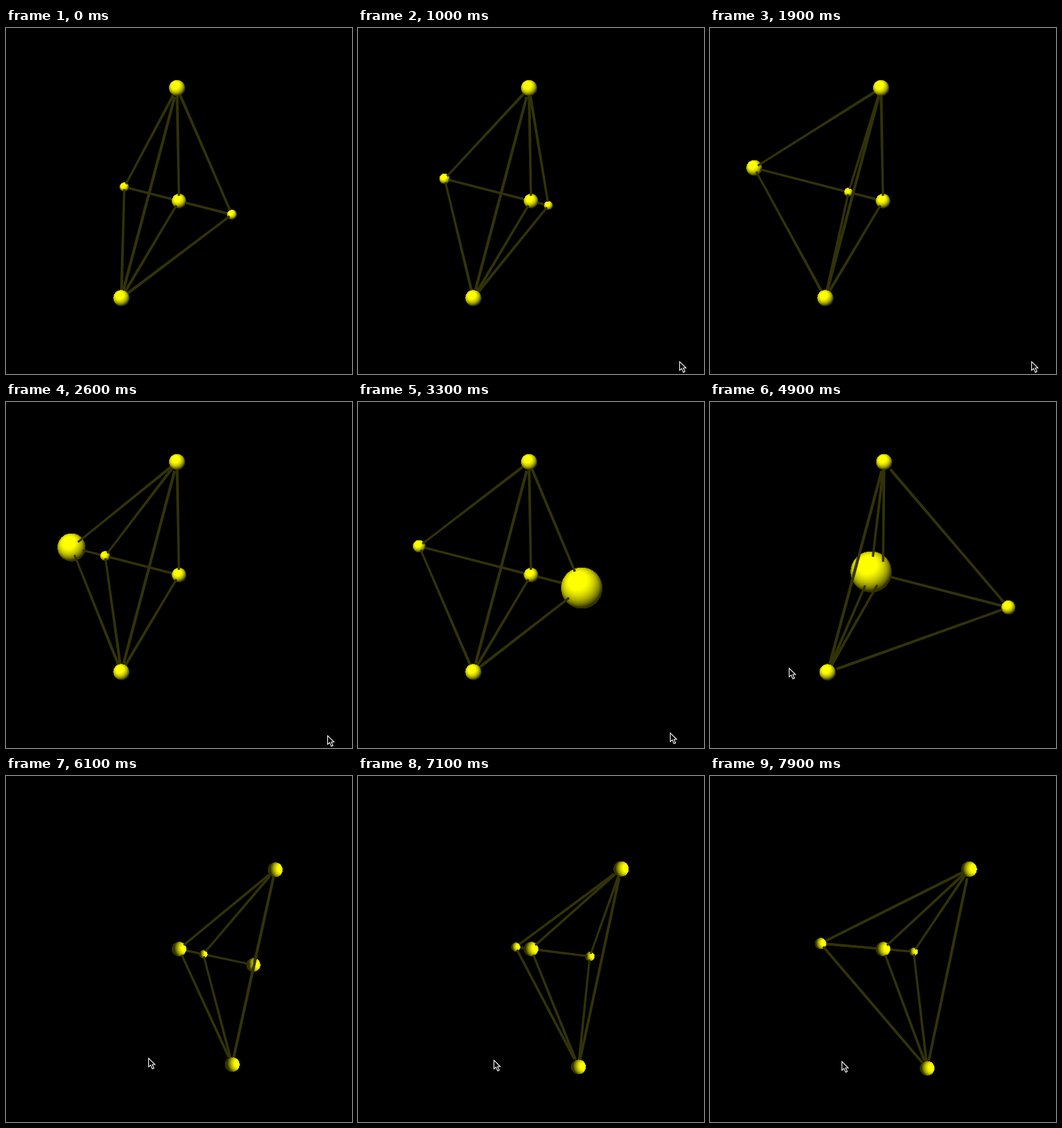
These frames come from a looping animation (518 px wide and 518 px high, 8 s). An HTML page with a canvas:

```html
<!DOCTYPE html>
<html>
<head>
<meta charset="utf-8">
<style>
html, body { margin: 0; width: 100%; height: 100%; overflow: hidden; background: #000; }
canvas { display: block; }
</style>
</head>
<body>
<canvas id="stage" width="518" height="518"></canvas>
<script>
const ctx = document.getElementById('stage').getContext('2d');
const RAD = Math.PI / 180;
const MID = 259, SCALE = 180, NEAR = 0.3096;   // 3D perspective
const W_DIST = 1.53;                           // viewer distance along the fourth axis
const TOP = [-0.013, 0.642, 0.767];
const LOW = [-0.376, -0.727, 0.601];
const AXIS = [0.928, -0.277, 0.247];           // third axis, turned into the fourth
const LIGHT = [-0.22, 0.25, 0.94];

function ease(t, from, to) {
  const f = Math.min(1, Math.max(0, (t - from) / (to - from)));
  return f * f * (3 - 2 * f);
}

// The pointer crosses the stage, then drags the camera out and partly back
function motion(t) {
  const cross = ease(t, 3200, 4050);
  const dragX = 97 * ease(t, 4780, 6100), dragY = 24 * ease(t, 4900, 6100);
  const back = ease(t, 6500, 7500);
  const dx = dragX - 16 * back, dy = dragY + 5 * back;
  return {
    x: 482 - 365 * cross + dx,
    y: 499 - 101 * cross + dy,
    view: [0.665 * dx, 0.8 * dy - 8.3, 3.5 * back]
  };
}

function makeCamera([az, el, roll]) {
  const [ca, sa, ce, se, cr, sr] = [az, el, roll]
    .flatMap(d => [Math.cos(d * RAD), Math.sin(d * RAD)]);
  return ([x, y, z]) => {
    const x1 = ca * x + sa * z, z1 = ca * z - sa * x;
    const y1 = ce * y - se * z1;
    return [cr * x1 - sr * y1, sr * x1 + cr * y1, ce * z1 + se * y];
  };
}

function project([x, y, z]) {
  const k = 1 / (1 - z * NEAR);
  return { x: MID + SCALE * x * k, y: MID - SCALE * y * k, z, k };
}

function makeNode(world, size, camera) {
  const pos = camera(world), p = project(pos);
  const r = 10.8 * size * p.k / (1 + 0.13 * Math.hypot(...pos) ** 2);
  return { ...p, pos, r, solid: r / (SCALE * p.k) };
}

function turningNode(angle, camera) {
  const size = W_DIST / (W_DIST - Math.sin(angle));
  const reach = Math.cos(angle) * size;
  return makeNode(AXIS.map(v => v * reach), size, camera);
}

const distance = (a, b) => Math.hypot(...a.map((v, i) => v - b[i]));

// Diffuse shading, pixel by pixel, with hard edges
function drawBall({ x, y, r }, [lx, ly, lz]) {
  for (let py = Math.floor(y - r); py <= y + r; py++) {
    for (let px = Math.floor(x - r); px <= x + r; px++) {
      const nx = (px + 0.5 - x) / r, ny = (y - py - 0.5) / r;
      const depth = 1 - nx * nx - ny * ny;
      if (depth < 0) continue;
      const lit = Math.max(0, nx * lx + ny * ly + Math.sqrt(depth) * lz);
      const v = Math.min(255, Math.round(255 * (0.2 + 0.9 * lit)));
      ctx.fillStyle = `rgb(${v},${v},0)`;
      ctx.fillRect(px, py, 1, 1);
    }
  }
}

// Short pieces of rod, so that each sorts correctly against the balls
function addRod(items, a, b, nodes) {
  const N = 70;
  const at = f => a.pos.map((v, i) => v + (b.pos[i] - v) * f);
  for (let i = 0; i < N; i++) {
    const mid = at((i + 0.5) / N);
    if (nodes.some(n => distance(mid, n.pos) < n.solid)) continue;
    const p = project(at(i / N)), q = project(at((i + 1.2) / N));
    items.push({
      z: mid[2],
      draw() {
        ctx.lineWidth = 3.3 * p.k;
        ctx.beginPath();
        ctx.moveTo(p.x, p.y);
        ctx.lineTo(q.x, q.y);
        ctx.stroke();
      }
    });
  }
}

function drawPointer(x, y) {
  ctx.save();
  ctx.translate(Math.round(x) - 0.5, Math.round(y) + 0.5);
  ctx.beginPath();
  [[0, 0], [0, 13], [3, 10.3], [5.6, 16], [8, 15], [5.5, 9.5], [9.6, 9.5]]
    .forEach(p => ctx.lineTo(...p));
  ctx.closePath();
  ctx.fillStyle = '#000';
  ctx.fill();
  ctx.strokeStyle = '#fff';
  ctx.lineWidth = 1.1;
  ctx.stroke();
  ctx.restore();
}

function render(t) {
  const { x, y, view } = motion(t);
  const step = Math.max(0.36, t / 100 - 4);
  const angle = (224.2 - 4.935 * step) * RAD;
  const camera = makeCamera(view);
  const light = camera(LIGHT);

  const nodes = [
    makeNode([0, 0, 0], 1, camera),
    makeNode(TOP, 1, camera),
    makeNode(LOW, 1, camera),
    turningNode(angle, camera),
    turningNode(angle + Math.PI / 2, camera)
  ];
  const swallowed = n => nodes.some(o => distance(n.pos, o.pos) + n.solid < o.solid);
  const items = nodes.filter(n => !swallowed(n))
    .map(n => ({ z: n.z, draw: () => drawBall(n, light) }));
  nodes.forEach((a, i) => nodes.slice(i + 1).forEach(b => addRod(items, a, b, nodes)));
  items.sort((a, b) => a.z - b.z);

  ctx.fillStyle = '#000';
  ctx.fillRect(0, 0, 518, 518);
  ctx.strokeStyle = '#333308';
  items.forEach(i => i.draw());
  if (t >= 500) drawPointer(x, y);
}

const start = performance.now();
let shown = -1;
function loop() {
  const t = Math.floor((performance.now() - start) % 8000 / 100) * 100;
  if (t !== shown) render(shown = t);
  requestAnimationFrame(loop);
}
loop();
</script>
</body>
</html>
```
